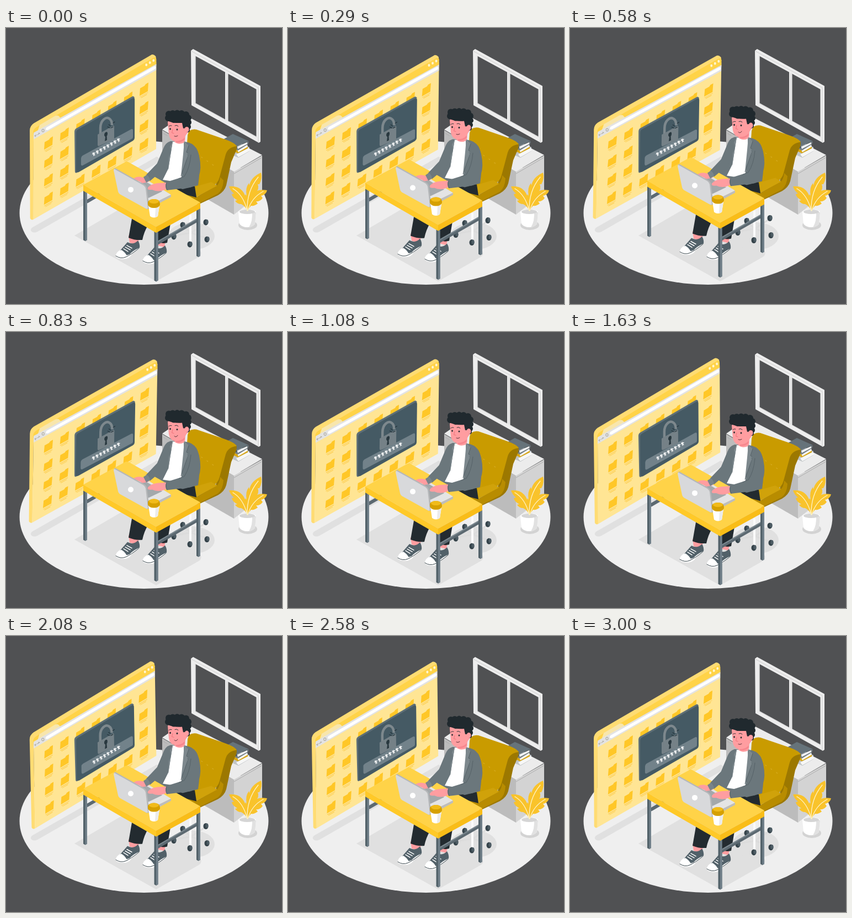
An HTML page for the animation above (3040 ms loop, 500 px wide and 500 px high).

```html
<!DOCTYPE html>
<html lang="en">
<head>
<meta charset="utf-8">
<title>Locked account</title>
<style>
html, body { margin: 0; width: 100%; height: 100%; overflow: hidden; background: #505153; }
svg { display: block; width: 100%; height: 100%; }
</style>
</head>
<body>
<svg viewBox="0 0 500 500" stroke-linejoin="round" stroke-linecap="round">
  <ellipse cx="250" cy="335" rx="225.500" ry="130" fill="#efefef"/>

  <g id="shadows" fill="#e0e0e0">
    <path d="M45 367Q44 363 50 360L273 233 284 239 57 369Q49 373 45 367Z"/>
    <path d="M124 376L220 320 353 405Q355 411 349 415L272 459Z"/>
    <ellipse cx="336" cy="377" rx="42" ry="25"/>
    <ellipse cx="438" cy="357" rx="17" ry="9" fill="#d3d3d3"/>
  </g>

  <g id="window">
    <path fill="#ededed" fill-rule="evenodd" d="M335 41L339 38 461 105V206L458 208 336 140ZM343.500 51V136L397 165.500V80ZM402.500 83V168.500L453.500 196.500V111Z"/>
    <path fill="none" stroke="#cecece" d="M336 42L457 108V207M343 51V136.500L397 166M400 82V167M403 169L454 197.500"/>
  </g>

  <g id="cabinet">
    <path fill="#bcbcbc" d="M283 185L413 260V338L283 263Z"/>
    <path fill="#d3d3d3" d="M413 260L464 231V298L413 338Z"/>
    <path fill="#ececec" d="M283 184L322 157 464 230 413 260Z"/>
    <path fill="none" stroke="#adadad" d="M285 191L292 195M413 264L463 235"/>
  </g>

  <g id="books">
    <path fill="#c1c5c7" d="M396 224L421 235 441 223 441 216 415 204Z"/>
    <path fill="#f7f7f7" d="M417 229L440 217 442 222 421 234Z"/>
    <path fill="#d9a714" d="M405 220L420 227 438 218 438 214Z"/>
    <path fill="#f7f7f7" d="M419 221L437 211 438 215 421 225Z"/>
    <path fill="#758087" d="M393 202L418 214 440 206 438 211 420 222 393 208Z"/>
    <path fill="#f7f7f7" d="M419 215L437 207 437 210 420 219Z"/>
    <path fill="#66737a" d="M393 202L411 192 440 205 418 214Z"/>
    <path fill="#46545b" d="M393 202L418 214V218L393 206Z"/>
  </g>

  <g id="screen">
    <path fill="#ffdc73" d="M43 186Q43 178 50 173L262 49Q266 46 271 51L272 58 50 193V347Q46 349 44 345Z"/>
    <path fill="#ffe594" d="M50 195Q50 188 56 184L267 59Q272 56 272 62V219L50 347Z"/>
    <path fill="#ffd348" d="M49 190Q49 184 55 180L266 54Q272 51 272 57V68L49 193Z"/>
    <path fill="#f8e6ac" d="M61 176L88 160Q94 157 97 161L100 165 57 188Z"/>
    <path fill="#e3e3e3" d="M50 190L272 65V76L50 202Z"/>
    <path fill="#fff" d="M74 180L268 69Q271 68 271 71T268 75L76 185Q71 186 72 183T74 180Z"/>
    <g fill="none" stroke="#aaa79b"><path d="M55 194l-3 1.500 2 1.500M57 193.500l4-2.500-2-.5"/><ellipse cx="67" cy="186" rx="2" ry="2.500"/></g>
    <g fill="#fff5cf"><ellipse cx="254" cy="66.500" rx="2" ry="2.500"/><ellipse cx="260.500" cy="62.500" rx="2" ry="2.500"/><ellipse cx="267" cy="58.500" rx="2" ry="2.500"/></g>
    <g id="folders"></g>
    <path fill="#5e6f77" d="M124 188Q124 184 127 182L228 124Q231 122 233 126L129 190V262Q125 264 125 260Z"/>
    <path fill="#455a64" d="M127 190Q127 186 130 184L229 127Q233 125 233 129V199Q233 202 230 204L132 261Q127 263 127 259Z"/>
    <path fill="#72828a" d="M136 236Q136 233 139 231L227 183Q230 182 230 185V197Q230 200 227 201L139 249Q136 250 136 247Z"/>
    <path fill="none" stroke="#7d888d" stroke-width="4.500" stroke-linecap="butt" d="M171 193V181C171 167 181 160 187 164Q192 167 192 176"/>
    <path fill="#758187" d="M166 193L194 177Q196 176 196 179V201L168 214Q166 214 166 211Z"/>
    <path fill="#29383f" d="M178 194Q178 190 181 188.500T184 191Q184 194 182.500 196L183 203 179 205 180 197Q178 196 178 194Z"/>
    <path fill="none" stroke="#26353c" stroke-width="1.200" d="M186 175L189 177M190 181L194 179M194 172L197 170M184 179L188 181"/>
    <g id="stars" stroke="#fff" stroke-width="1.300"></g>
  </g>

  <g id="desk">
    <g id="chairBase">
      <path fill="none" stroke="#dcdcdc" stroke-width="3" d="M335 371L320 359M335 371L361 354M335 371L363 381M335 371L306 376"/>
      <path fill="none" stroke="#fafafa" stroke-width="4" d="M334 340V386"/>
      <g id="wheels"></g>
    </g>
    <path fill="#9c7800" d="M397 208L417 213Q419 215 417 222L408 243 399 285Q396 296 384 303L350 319 342 308 380 286Z"/>
    <path fill="#c99b00" d="M329 194Q331 182 345 184L389 199Q414 207 418 214 402 216 398 229L387 270Q384 283 372 287L344 296V312L322 301Z"/>
    <path fill="#d0a20a" d="M320 294L372 279 383 286 345 306Z"/>
    <path fill="#b88c00" d="M318 295L346 306 382 286Q387 281 388 270L394 276Q393 293 384 300L347 319 318 304Z"/>
    <path fill="none" stroke="#dfb635" stroke-dasharray="2 10" d="M354 234L382 253"/>

    <g id="legs">
      <path fill="#ff9da0" d="M222 376L241 382 239 393 224 389ZM275 383L289 386 287 397 275 394Z"/>
      <path fill="#232b30" d="M229 340L258 356Q250 369 247 384 234 385 222 380ZM274 366L299 348 292 389Q282 392 275 387Z"/>
      <g id="shoe">
        <path fill="#fff" d="M199 412Q199 407 207 402L240 392 241 400Q229 406 225 414 218 420 207 418 199 417 199 412Z"/>
        <path fill="#526169" d="M206 404L220 388Q231 394 239 385 243 391 242 398 230 403 224 410 216 414 207 409Z"/>
        <path fill="#fff" d="M200 410Q203 404 209 402 216 406 219 413 207 417 200 410Z"/>
        <path fill="none" stroke="#fff" stroke-width="1.500" d="M213 400L221 405M216 397L225 402M219 394L228 399"/>
        <path fill="none" stroke="#39464c" d="M199 413Q208 419 217 415T241 399"/>
      </g>
      <use href="#shoe" x="49" y="9"/>
    </g>

    <g id="body">
      <path fill="#232b30" d="M285 277L342 287 345 307 326 302 286 291Z"/>
      <path fill="#6b777c" d="M298 205Q288 208 285 219L272 250 262 264 278 279 320 292 348 285Q355 235 345 218 337 207 324 206Z"/>
      <path fill="#fff" d="M302 206L322 207Q324 240 316 280L284 275 294 255Z"/>
      <path fill="#ff9da0" d="M306 198L325 193 324 207Q313 213 305 206Z"/>
      <path fill="#7d888d" d="M323 205L331 213 327 225 331 228 317 268 321 228ZM302 205L297 215 299 224 295 228 294 257 299 224Z"/>
      <path fill="none" stroke="#566268" d="M331 213L327 225 331 228 317 268M329 229L337 245"/>
    </g>

    <g id="head">
      <path fill="#ff9da0" d="M293 171Q294 163 310 163L331 174Q334 182 329 190 325 194 323 201 315 207 305 205 297 203 295 193Z"/>
      <path fill="#f7878e" d="M308 205Q318 205 324 198V202Q317 209 308 207Z"/>
      <g id="hair" fill="#20292e"></g>
      <path fill="#20292e" d="M292 165Q292 154 310 152 332 151 334 169L331 189 325 187Q325 180 321 182L319 172Q303 173 292 168Z"/>
      <ellipse cx="327.500" cy="184" rx="4" ry="5" fill="#ff9da0"/>
      <g fill="none" stroke="#30373b">
        <path d="M295 178Q297 176 300 177M306 177Q309 175 312 178"/>
        <path stroke="#ee737b" d="M302 184L300.500 190 304 191"/>
        <path id="mouth" stroke="#593339"/>
      </g>
      <g fill="#252c30"><ellipse cx="297.500" cy="183" rx="1.400" ry="1.700"/><ellipse cx="310" cy="184" rx="1.400" ry="1.700"/></g>
    </g>

    <g id="table">
      <path fill="none" stroke="#5c6971" stroke-width="6" stroke-linecap="butt" d="M146 315L170 301M274 390L347 348"/>
      <path fill="none" stroke="#7c8990" stroke-width="2" d="M275 387L346 346"/>
      <g id="tableLegs"></g>
      <path fill="#ffd348" d="M140 284L214 244Q218 241 222 243L352 316 272 360Z"/>
      <path fill="#ffc928" d="M140 284L272 360V371L140 295Z"/>
      <path fill="#f9bd18" d="M272 360L352 316V327L272 371Z"/>
    </g>

    <g id="laptop">
      <path fill="#e4e4e4" d="M205 294L250 272 299 302 258 323Z"/>
      <path fill="#bdbdbd" d="M258 322L299 302V306L258 328Z"/>
      <path fill="#a3a8ab" d="M228 288L251 277 283 296 258 308Z"/>
    </g>
    <g id="arms">
      <path fill="#ff9da0" d="M260 267L248 271Q239 268 232 272 229 275 238 276L247 281 258 279ZM294 280L275 281Q263 282 257 289 255 294 265 293 276 298 288 293L295 290Z"/>
      <path fill="#6b777c" d="M286 216L274 245 254 266Q256 274 261 277L286 256 299 224Z"/>
      <path fill="#78848a" d="M249 270L255 266Q260 269 261 276L254 280Z"/>
      <path fill="#6b777c" d="M332 216Q345 212 350 232 355 255 349 269 344 287 333 289L291 294Q287 286 291 279L323 269Z"/>
      <path fill="none" stroke="#566268" d="M335 230Q333 254 323 269L313 273M291 280Q288 287 292 293"/>
    </g>
    <path fill="#b5b7b9" d="M196 255Q197 253 200 255L250 283Q254 285 255 289L260 326 258 328 254 328Z"/>
    <path fill="#d8d9db" d="M195 258Q195 254 199 257L249 285Q252 287 253 291L257 326Q257 329 253 327L208 302Q204 300 203 296Z"/>
    <ellipse cx="226" cy="293" rx="5" ry="5" fill="#fff"/>

    <g id="cup">
      <path fill="#fff" d="M258 322H278L275 341Q268 346 261 341Z"/>
      <path fill="#ebebeb" d="M271 325L278 322 275 341 270 343Z"/>
      <path fill="#d6a000" d="M257 317Q257 313 260 312 268 308 276 312 279 314 279 320 277 326 268 326T257 320Z"/>
      <ellipse cx="268" cy="314" rx="9" ry="4" fill="#f1bb1a"/>
    </g>
  </g>

  <g id="plant">
    <path fill="#fff" d="M421 334Q421 329 437 329T453 334L451 355Q446 361 437 361T423 355Z"/>
    <path fill="#e1e1e1" d="M446 331L453 334 451 355Q447 360 440 361 447 351 446 331Z"/>
    <ellipse cx="437" cy="333" rx="14" ry="4" fill="#d5d5d5"/>
    <g fill="#f9c32b">
      <path d="M437 331Q433 322 426 319 419 319 415 313L419 312Q410 307 409 301L413 300Q406 294 404 287 424 285 432 301 438 313 438 331Z"/>
      <path d="M436 327Q429 312 434 301L436 304Q433 290 440 281L441 285Q444 270 462 262 465 272 459 283L456 283Q460 292 451 299L448 298Q452 308 437 327Z"/>
      <path d="M438 331Q437 309 447 299 458 291 473 294 471 302 462 304L465 308Q460 315 453 314L456 318Q450 323 444 322 440 326 438 331Z"/>
    </g>
    <path fill="none" stroke="#fff3c5" stroke-width="1.300" d="M411 291Q430 302 437 331 436 295 457 270M438 331Q445 307 466 296"/>
  </g>
</svg>
<script>
const $ = id => document.getElementById(id);
const fill = (id, items, draw) => { $(id).innerHTML = items.map(draw).join(''); };
const range = n => [...Array(n).keys()];

fill('folders', range(28), i => {
  const col = i % 7, row = Math.floor(i / 7);
  const x = 77 + col * 28.8, y = 210 - col * 16.3 + row * 33.3;
  return `<g transform="matrix(1 -.57 0 1 ${x} ${y})">
    <path fill="#ffc727" d="M-7-7H1L3-9H8L7 6H-8Z"/>
    <path stroke="#fbc63a" stroke-width=".9" d="M-7 8.500H7M-5 11H5"/></g>`;
});

fill('stars', range(8), i => {
  const x = 159 + i * 6.4, y = 228.5 - i * 3.65;
  return `<path d="M${x} ${y - 2.9}v5.800M${x - 2.2} ${y + 0.2}l4.400-2.400M${x - 2} ${y - 2}l4 3.600"/>`;
});

fill('wheels', [[320, 357], [362, 352], [364, 383], [333, 392], [304, 378]], ([x, y]) =>
  `<ellipse cx="${x}" cy="${y}" rx="4.500" ry="5.500" fill="#35434a"/>
   <ellipse cx="${x + 2}" cy="${y - 1}" rx="2.500" ry="4" fill="#4d5c64"/>`);

fill('hair', [[294, 163, 6], [295, 156, 6], [302, 155, 6], [310, 154, 5.5], [318, 155, 6],
  [326, 157, 6], [330, 163, 6], [331, 171, 5], [330, 179, 5], [329, 185, 4], [304, 166, 6]],
  ([x, y, r]) => `<circle cx="${x}" cy="${y}" r="${r}"/>`);

fill('tableLegs', [[140, 294, 385], [268.5, 369, 458.5], [345, 326, 414]], ([x, top, end]) =>
  `<path fill="#53626a" d="M${x} ${top}h7V${end - 1}l-3.500 2-3.500-2Z"/>
   <path fill="#71808a" d="M${x + 3.5} ${top}h3.500V${end - 1}l-3.500 2Z"/>`);

const LOOP = 3040, SWAY = 3000, BOB = 1500, LEAD = 50;

function render(now) {
  const t = now % LOOP + LEAD;
  const tilt = Math.sin(2 * Math.PI * t / SWAY);
  const lift = (1 - Math.cos(2 * Math.PI * t / BOB)) / 2;
  $('screen').setAttribute('transform', `rotate(${tilt} 158 199)`);
  $('desk').setAttribute('transform', `translate(0 ${-8 * lift})`);
  const curve = 1 + 3 * Math.max(0, lift - 0.5);
  $('mouth').setAttribute('d', `M305 196Q308 ${196 + curve * 1.5} 311 ${196 - curve * 0.6}`);
}

const start = performance.now();
function tick() {
  render(performance.now() - start);
  requestAnimationFrame(tick);
}
tick();
</script>
</body>
</html>
```
